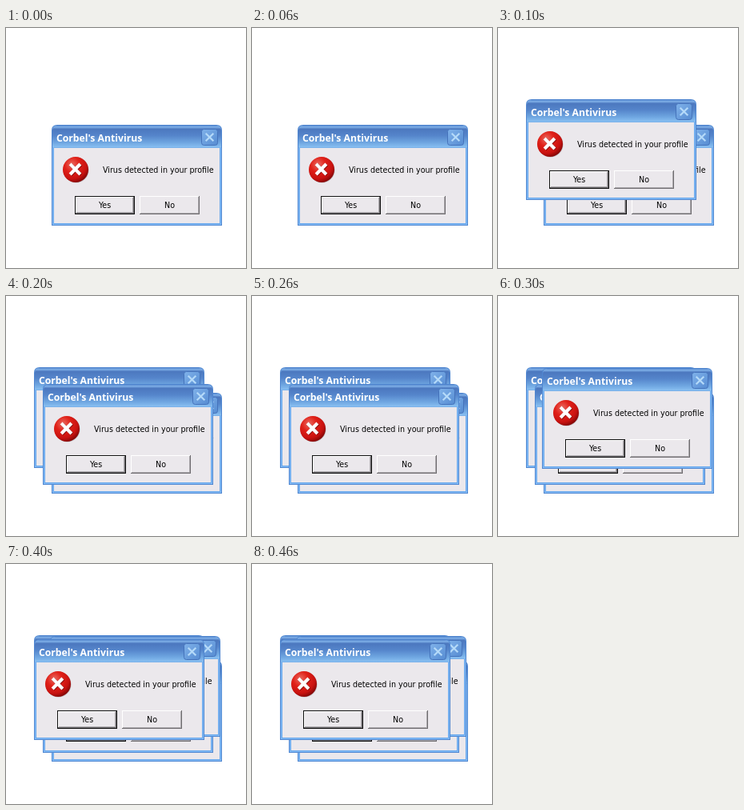
Animation, 300 px wide and 300 px high, one loop 0.5 s. Source, as an HTML page:

```html
<!DOCTYPE html>
<html lang="en">
<head>
<meta charset="utf-8">
<title>Alert windows</title>
<style>
html, body { margin: 0; width: 100%; height: 100%; overflow: hidden; background: #fff; }
svg { display: block; width: 100vw; height: 100vh; }
text { font: 10.6px "DejaVu Sans Condensed", "DejaVu Sans", sans-serif; font-stretch: condensed; fill: #000; }
.title { font: bold 12.2px "Open Sans", "Noto Sans", sans-serif; fill: #fff; }
.mid { text-anchor: middle; }
</style>
</head>
<body>
<svg id="stage" viewBox="0 0 300 300">
  <defs>
    <linearGradient id="bar" x1="0" y1="0" x2="0" y2="1">
      <stop offset="0" stop-color="#5585cc"/>
      <stop offset=".06" stop-color="#7fb0e8"/>
      <stop offset=".16" stop-color="#4c78bf"/>
      <stop offset=".45" stop-color="#5585cb"/>
      <stop offset=".75" stop-color="#6ea5e0"/>
      <stop offset=".95" stop-color="#86bdf0"/>
      <stop offset="1" stop-color="#74abe6"/>
    </linearGradient>
    <linearGradient id="close" x1="0" y1="0" x2="1" y2="1">
      <stop offset="0" stop-color="#80b2ea"/>
      <stop offset="1" stop-color="#568cd2"/>
    </linearGradient>
    <radialGradient id="red" cx=".36" cy=".3" r=".75">
      <stop offset="0" stop-color="#ea6a60"/>
      <stop offset=".4" stop-color="#e02018"/>
      <stop offset=".75" stop-color="#c81210"/>
      <stop offset="1" stop-color="#7c0606"/>
    </radialGradient>
  </defs>
</svg>
<script>
const NS = "http://www.w3.org/2000/svg";
const STEP = 100;
const SPOTS = [[57, 121], [35, 89], [46, 110], [55, 90], [35, 94]];
const stage = document.getElementById("stage");

const rect = (x, y, w, h, fill) =>
  `<rect x="${x}" y="${y}" width="${w}" height="${h}" fill="${fill}"/>`;
const cross = (x, y, r, color, width) =>
  `<path d="M${x - r} ${y - r}l${2 * r} ${2 * r}m0 ${-2 * r}l${-2 * r} ${2 * r}" stroke="${color}" stroke-width="${width}" fill="none"/>`;

function button(x, label, chosen) {
  const y = 89, w = 75, h = 23;
  const inset = chosen ? 1 : 0;
  const [bx, by, bw, bh] = [x + inset, y + inset, w - 2 * inset, h - 2 * inset];
  return (chosen ? rect(x, y, w, h, "#111") : "") +
    rect(bx, by, bw, bh, "#6f6d70") +
    rect(bx, by, bw - 1, bh - 1, "#fff") +
    rect(bx + 1, by + 1, bw - 2, bh - 2, "#aaa7ab") +
    rect(bx + 1, by + 1, bw - 3, bh - 3, "#ebe8ec") +
    `<text class="mid" x="${x + w / 2}" y="104">${label}</text>`;
}

function dialog([x, y]) {
  const g = document.createElementNS(NS, "g");
  g.setAttribute("transform", `translate(${x} ${y})`);
  g.innerHTML =
    `<path d="M0 126V7Q0 0 7 0H206Q213 0 213 7V126Z" fill="#4f86d0"/>` +
    `<path d="M1 125V7Q1 1 7 1H206Q212 1 212 7V125Z" fill="#86bdf6"/>` +
    `<path d="M1 29V7Q1 1 7 1H206Q212 1 212 7V29Z" fill="url(#bar)"/>` +
    rect(2, 29, 209, 95, "#66a6ec") +
    rect(3, 29, 207, 94, "#ebe8ec") +
    `<text class="title" x="6" y="21">Corbel's Antivirus</text>` +
    `<rect x="187.5" y="5.5" width="20" height="20" rx="3" fill="url(#close)" stroke="#4573bb"/>` +
    cross(197.5, 15.5, 4.8, "#b5daf9", 2.2) +
    `<circle cx="30.5" cy="56.5" r="16" fill="#8d8086" opacity=".5"/>` +
    `<circle cx="30" cy="56" r="16" fill="url(#red)"/>` +
    cross(30.2, 56.2, 6.5, "#8c0b0b", 4.6) +
    cross(29.5, 55.5, 6.4, "#fff", 4.2) +
    `<text x="64" y="60">Virus detected in your profile</text>` +
    button(29, "Yes", true) + button(110, "No", false);
  return stage.appendChild(g);
}

const dialogs = SPOTS.map(dialog);

// Each step opens one more dialog on top of the stack.
function draw(ms) {
  const top = Math.floor(ms / STEP) % SPOTS.length;
  dialogs.forEach((g, i) => g.setAttribute("visibility", i <= top ? "visible" : "hidden"));
}

let start;
function tick(now) {
  start ??= now;
  draw(Math.max(0, now - start));
  requestAnimationFrame(tick);
}
draw(0);
requestAnimationFrame(tick);
</script>
</body>
</html>
```
